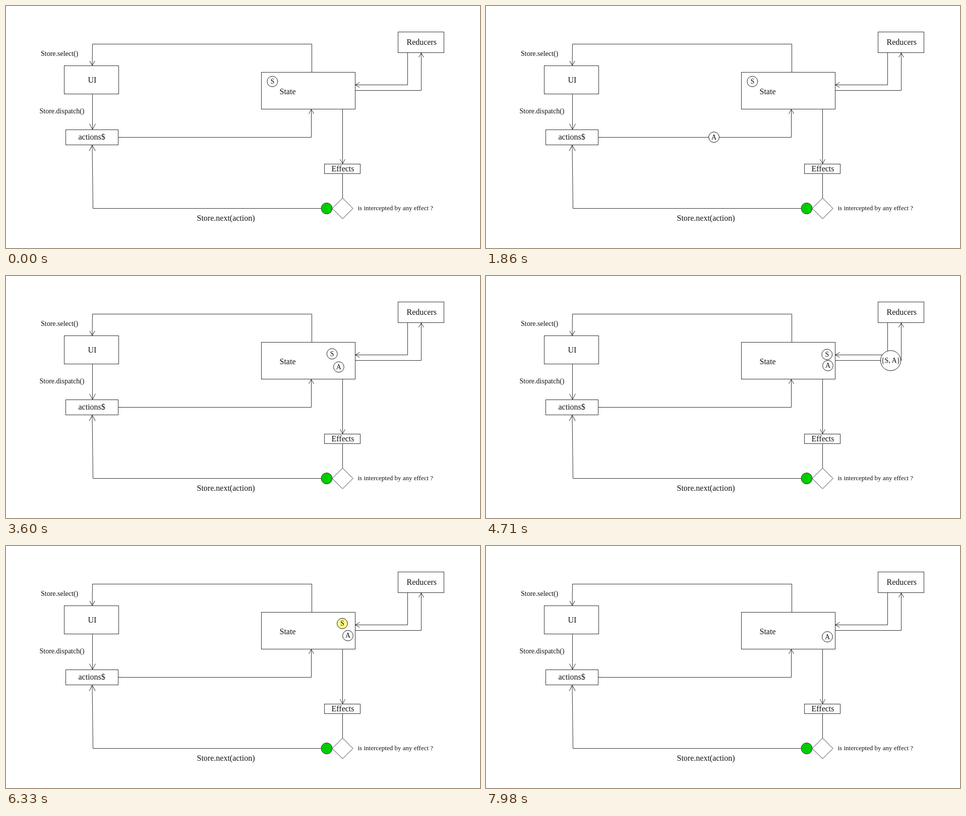
An HTML page that plays this animation: 940x480 px, repeating every 8000 ms.

```html
<!DOCTYPE html>
<html lang="en">
<head>
<meta charset="utf-8">
<title>State flow</title>
<style>
  html, body { margin: 0; width: 100%; height: 100%; overflow: hidden; background: #fff; }
  svg { display: block; }
  rect, circle, path { fill: #fff; stroke: #333; }
  .line { fill: none; marker-end: url(#head); }
  .wide { marker-end: url(#wideHead); }
  marker { overflow: visible; }
  marker path { fill: none; }
  text { font: 16px "Liberation Serif", "Times New Roman", serif; fill: #111; }
  .small { font-size: 14px; }
  .note { font-size: 13px; }
  .token text { font-size: 14px; text-anchor: middle; }
  .token circle { stroke: #1a1a1a; }
</style>
</head>
<body>
<svg width="940" height="480" viewBox="0 0 940 480">
  <marker id="head" orient="auto"><path d="M-9 -5L0 0L-9 5"/></marker>
  <marker id="wideHead" orient="auto"><path d="M-11.5 -6L0 0L-11.5 6"/></marker>

  <path class="line" d="M606.5 131.5V75.5H171.5L171 118"/>
  <path class="line wide" d="M171.5 174.5V245"/>
  <path class="line" d="M222.5 260.5H605.5V205"/>
  <path class="line" d="M667.5 381V313"  style="marker-end:none"/>
  <path class="line" d="M667.5 204.5V313"/>
  <path class="line" d="M692.5 167.5H823.5V93"/>
  <path class="line" d="M796.5 92.5V156.5H692.5"/>
  <path class="line wide" d="M625 401.5H172.5L171 276"/>
  <path d="M667.5 381L688 401.5L667.5 422L647 401.5Z"/>
  <circle cx="636" cy="401.5" r="11" style="fill:#00cc00"/>

  <g class="token" id="pair"><circle r="20"/><text y="4.5">{S, A}</text></g>
  <rect x="506.5" y="131.5" width="186" height="73"/>
  <text x="542.5" y="175">State</text>
  <g class="token" id="state"><circle r="10.4"/><text y="4.5">S</text></g>
  <g class="token" id="action"><circle r="10.4"/><text y="4.5">A</text></g>
  <g class="token" id="fresh"><circle r="10.4" style="fill:#fffa8c"/><text y="4.5">S</text></g>

  <rect x="115.5" y="118.5" width="108" height="56"/>
  <rect x="118.5" y="245.5" width="104" height="30"/>
  <rect x="777.5" y="51.5" width="91" height="41"/>
  <rect x="631.5" y="313.5" width="71" height="19"/>
  <text x="162.5" y="152">UI</text>
  <text x="143.5" y="265">actions$</text>
  <text x="794.5" y="77">Reducers</text>
  <text x="645.5" y="328">Effects</text>
  <text x="378.5" y="426">Store.next(action)</text>
  <text class="small" x="69" y="99">Store.select()</text>
  <text class="small" x="66.5" y="213">Store.dispatch()</text>
  <text class="note" x="697.5" y="405">is intercepted by any effect ?</text>
</svg>
<script>
  const LOOP = 8000, STEP = 30;

  // A token follows each path at an even speed and rests at its end.
  function leg(start, end, d) {
    const path = document.createElementNS("http://www.w3.org/2000/svg", "path");
    path.setAttribute("d", d);
    const length = path.getTotalLength();
    return { start, at: t => path.getPointAtLength(length * Math.min(1, Math.max(0, (t - start) / (end - start)))) };
  }

  const tokens = {
    action: { from: 0, to: LOOP, legs: [
      leg(0, 900, "M171 150V260"),
      leg(900, 2400, "M179.3 260.2H605.5"),
      leg(2400, 2700, "M605.5 260.2V188.5"),
      leg(2700, 3900, "M605.5 188.5L678 177.8"),
      leg(7950, 8250, "M678 177.8L667.5 200")] },
    state: { from: 0, to: 6270, legs: [leg(2400, 3900, "M528.3 149.8L676.3 155.6")] },
    pair: { from: 3900, to: 5250, legs: [
      leg(3900, 4830, "M664 167.8H823"),
      leg(4830, 5250, "M823 167.8V72")] },
    fresh: { from: 5540, to: 7960, legs: [
      leg(5540, 6187, "M796.5 72V156.5H692"),
      leg(6187, 6678, "M692 156.5L606 147"),
      leg(6678, 7633, "M606 147V75.5H171.5"),
      leg(7633, 7960, "M171.5 75.5V147")] }
  };

  function draw(now) {
    const t = Math.floor((now % LOOP) / STEP) * STEP;
    for (const [id, { from, to, legs }] of Object.entries(tokens)) {
      const node = document.getElementById(id);
      const current = legs.filter(part => part.start <= t).pop() || legs[0];
      const { x, y } = current.at(t);
      node.setAttribute("transform", `translate(${x} ${y})`);
      node.style.display = t >= from && t < to ? "" : "none";
    }
    requestAnimationFrame(draw);
  }
  draw(0);
</script>
</body>
</html>
```
